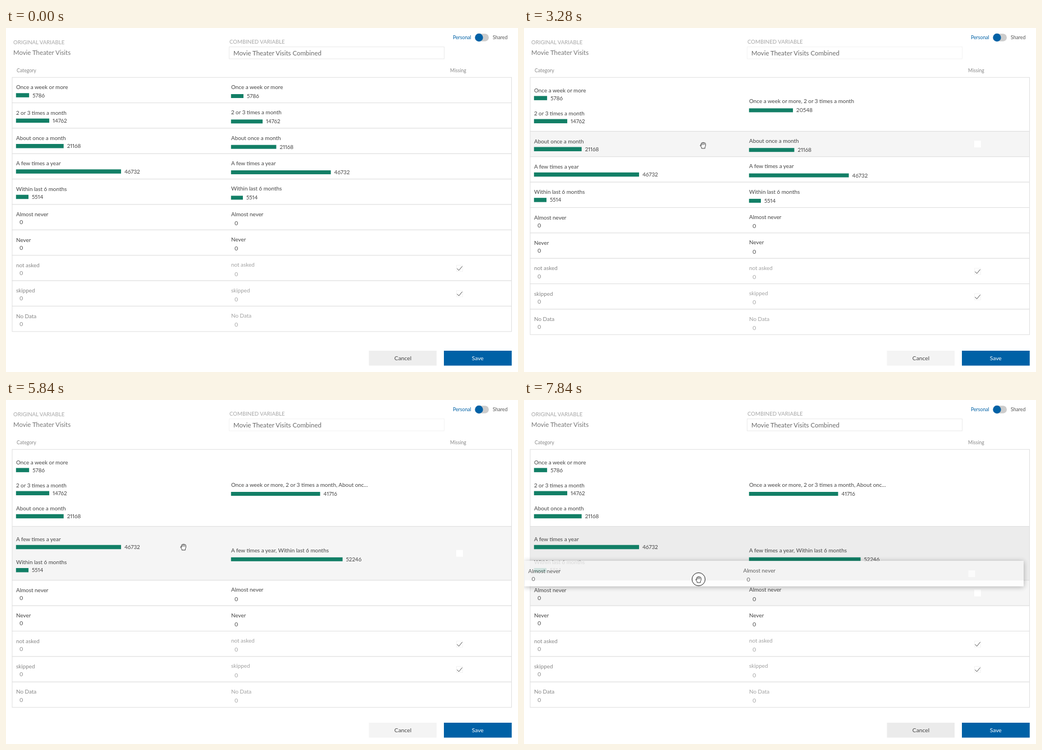
Animation of 912 by 614 pixels, one loop 8 s. Source, as an HTML page:

```html
<!DOCTYPE html>
<html lang="en">
<head>
<meta charset="utf-8">
<title>Combine categories</title>
<style>
  html, body { margin: 0; width: 100%; height: 100%; overflow: hidden; background: #fff; }
  svg { display: block; width: 100%; height: 100%; font-family: Lato, "Open Sans", sans-serif; font-variant-numeric: proportional-nums; }
  .sheet { filter: drop-shadow(0 1px 5px rgba(0, 0, 0, .36)); }
</style>
</head>
<body>
<svg id="stage" viewBox="0 0 912 614"></svg>
<script>
const LOOP = 8000, STEP = 80;
const TOP = 88.2, LEFT = 11, WIDTH = 889.5, ROW = 45.36, LINE = 41.2;
const GREEN = '#127f66', BLUE = '#0061a6';
const stage = document.getElementById('stage');

const categories = [
  ['Once a week or more', 5786],
  ['2 or 3 times a month', 14762],
  ['About once a month', 21168],
  ['A few times a year', 46732],
  ['Within last 6 months', 5514],
  ['Almost never', 0],
  ['Never', 0],
  ['not asked', 0, 'missing'],
  ['skipped', 0, 'missing'],
  ['No Data', 0, 'empty']
];

// Cursor path: time, x, y
const path = [
  [240, 470, 560], [1120, 329, 160], [1360, 329, 160], [1600, 326, 158],
  [2080, 326, 158], [2640, 312, 130], [2720, 312, 130], [3280, 319, 209],
  [3440, 319, 209], [4080, 301, 187], [4160, 301, 187], [4800, 324, 295],
  [5040, 324, 295], [5280, 311, 279], [5600, 316, 262], [6000, 316, 262],
  [6880, 322, 354], [7040, 308, 338], [7760, 311, 321], [7840, 311, 320]
];

// A drag carries one row, held at the point (x, y)
const drags = [
  { from: 2160, drop: 2800, row: 1, x: 326, y: 158, alias: 2640 },
  { from: 3520, drop: 4240, row: 1, x: 316, y: 214, alias: 4080 },
  { from: 5120, drop: 5760, row: 2, x: 324, y: 295.5, alias: 5600 },
  { from: 6960, drop: 8000, row: 2, x: 321.5, y: 354.5, alias: 8000 }
];

const rect = (x, y, w, h, fill, more = '') =>
  `<rect x="${x}" y="${y}" width="${w}" height="${h}" fill="${fill}" ${more}/>`;
const text = (x, y, size, fill, str, more = '') =>
  `<text x="${x}" y="${y}" font-size="${size}" fill="${fill}" ${more}>${str}</text>`;
const stroke = (d, color, w, fill = 'none') =>
  `<path d="${d}" fill="${fill}" stroke="${color}" stroke-width="${w}" stroke-linecap="round" stroke-linejoin="round"/>`;

function cursorAt(t) {
  const i = path.findIndex(p => p[0] > t);
  if (i < 1) return path[i < 0 ? path.length - 1 : 0].slice(1);
  const [t0, x0, y0] = path[i - 1], [t1, x1, y1] = path[i];
  const k = (t - t0) / (t1 - t0), e = k * k * (3 - 2 * k);
  return [x0 + (x1 - x0) * e, y0 + (y1 - y0) * e];
}

function layout(t) {
  const groups = categories.map(c => [c]);
  for (const d of drags) {
    if (t >= d.drop) groups[d.row - 1].push(...groups.splice(d.row, 1)[0]);
  }
  let y = TOP;
  return groups.map(items => {
    const n = items.length, h = n > 1 ? LINE * n + 13.8 : ROW;
    const row = { items, y, h };
    y += h;
    return row;
  });
}

function entry(x, y, gap, scale, thick, name, value, fill) {
  const w = value * scale;
  return text(x, y, 9.9, fill, name) +
    (w ? rect(x - .2, y + gap - 3.5 - thick / 2, w + .2, thick, GREEN) : '') +
    text(x + w + 6, y + gap, 9.8, fill, value);
}

function rowBody({ items, y, h }, hover) {
  const kind = items[0][2], mid = y + h / 2;
  const first = items.length > 1 ? y + 26.3 : y + 21.2;
  const left = items.map(([name, value], i) =>
    entry(18, first + LINE * i, 14.1, .004, 7.5, name, value, kind ? '#858585' : '#444')).join('');
  let name = items.map(c => c[0]).join(', ');
  if (name.length > 52) name = name.slice(0, 52) + '...';
  const sum = items.reduce((s, c) => s + c[1], 0);
  const right = entry(401, mid - 2.1, 16.2, .0038, 7, name, sum, kind ? '#a0a0a0' : '#444');
  let box = '';
  if (kind === 'missing') {
    box = rect(802.5, mid - 5, 11, 11, '#fff', 'stroke="#f3f3f3"') +
      stroke(`M803.7 ${mid + 1.2}l2.9 3.1 5.8-7`, '#444', .95);
  } else if (hover) {
    box = rect(802, mid - 6, 12, 12, '#fff');
  }
  return left + right + box;
}

function chrome(idle, dragging) {
  const cancel = dragging ? '#ebebeb' : idle ? '#eee' : '#f4f4f4';
  const border = dragging || idle ? '#eaeaea' : '#f3f3f3';
  const mid = 'text-anchor="middle"';
  return rect(0, 0, 912, 614, '#fff') +
    text(13, 29.4, 9.65, '#a6a6a6', 'ORIGINAL VARIABLE') +
    text(13, 48, 11.4, '#777', 'Movie Theater Visits') +
    text(398, 28, 9.65, '#a6a6a6', 'COMBINED VARIABLE') +
    rect(397.5, 33.7, 383, 21.3, '#fff', `stroke="${border}"`) +
    text(405, 48.5, 11.45, '#6a6a6a', 'Movie Theater Visits Combined') +
    text(19, 78.5, 8.7, '#888', 'Category') +
    text(791, 78.5, 8.6, '#888', 'Missing') +
    text(796, 20, 8.7, BLUE, 'Personal') +
    rect(835.5, 10.3, 24.5, 13.4, '#ccc', 'rx="6.7"') +
    `<circle cx="842.5" cy="17" r="7.2" fill="${BLUE}"/>` +
    text(867, 20, 8.7, '#555', 'Shared') +
    rect(646.5, 576, 120.5, 26.6, cancel) + text(707, 593.2, 10.3, '#444', 'Cancel', mid) +
    rect(780, 576, 120.8, 26.6, BLUE) + text(840.2, 593.2, 10.3, '#fff', 'Save', mid);
}

function pointer(x, y, pressed, alias) {
  const ring = pressed ? '<circle r="11.7" fill="#fff" fill-opacity=".75" stroke="#222" stroke-width="1"/>' : '';
  const icon = alias
    ? stroke('M-3 4Q-3 0 1-2', '#999', 3) + stroke('M-3 3Q-3 0 1-2M-2-4.5H2.5V0Z', '#111', 1.6, '#111')
    : stroke('M-3 6V4.4L-5.3 1.4Q-6-.4-4.4-.6L-3.6.2V-3.2Q-3.2-4.7-1.9-4.1Q-1.2-6 .3-4.8Q1.5-5.7 2.4-4.3Q4.3-4.7 4.8-2.8V1.5L3.6 4.2V6Z', '#333', 1, '#fff') +
      stroke('M-1.7-3.8V-.6M.4-4.4V-.6M2.5-4V-.6M-3.6.2V1.4', '#333', .8);
  return `<g transform="translate(${x} ${y})">${ring}<g transform="scale(.92)">${icon}</g></g>`;
}

function card(row, target, dx, dy) {
  const shade = target
    ? rect(LEFT, row.y, WIDTH, Math.min(row.h, -dy), '#f5f5f5') : '';
  return `<g transform="translate(${dx} ${dy})" opacity=".84">` +
    rect(LEFT, row.y, WIDTH, row.h, '#fff', 'class="sheet"') +
    shade + rowBody(row, true) + '</g>';
}

function draw(t) {
  const idle = t < 320;
  const drag = drags.find(d => t >= d.from && t < d.drop);
  const rows = layout(t);
  const [x, y] = cursorAt(t);
  const hover = drag ? drag.row
    : idle ? -1 : rows.findIndex(r => y >= r.y && y < r.y + r.h);
  const dx = drag ? x - drag.x : 0, dy = drag ? y - drag.y : 0;
  const target = drag && dy < -22 ? drag.row - 1 : -1;

  let out = chrome(idle, !!drag);
  rows.forEach((r, i) => {
    const fill = i === target ? '#ececec' : i === hover ? '#f5f5f5' : '#fff';
    out += rect(LEFT, r.y, WIDTH, r.h, fill, 'stroke="#dfdfdf"');
  });
  rows.forEach((r, i) => out += rowBody(r, i === hover));
  if (drag) out += card(rows[drag.row], target >= 0, dx, dy);
  if (!idle) out += pointer(x, y, !!drag, drag && t >= drag.alias);
  stage.innerHTML = out;
}

let last = -1;
function tick() {
  const t = Math.floor(performance.now() % LOOP / STEP) * STEP;
  if (t !== last) draw(last = t);
  requestAnimationFrame(tick);
}
tick();
</script>
</body>
</html>
```
